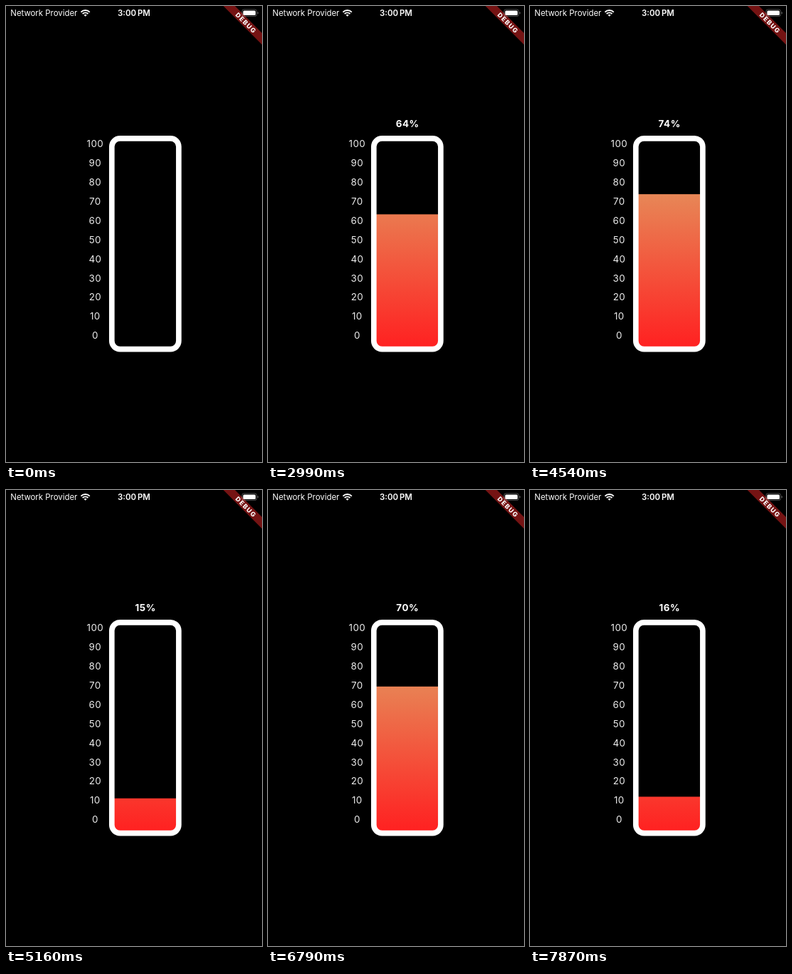
Animation of 360x640 px, one loop 7.99 s. Source, as an HTML page:

```html
<!DOCTYPE html>
<html lang="en">
<head>
<meta charset="utf-8">
<title>Level gauge</title>
<style>
html, body { margin: 0; width: 100%; height: 100%; overflow: hidden; background: #000; }
svg { display: block; width: 360px; height: 640px; font-family: Inter, Roboto, sans-serif; fill: #fff; }
.mid { text-anchor: middle; }
.scale { font-size: 13.4px; letter-spacing: .35px; fill: #ececec; }
#value { font-size: 13.4px; font-weight: 700; letter-spacing: .5px; }
.bar { font-size: 11.4px; }
.clock { font-size: 11.5px; font-weight: 600; word-spacing: -1.2px; }
.debug { font-size: 9.3px; font-weight: 800; letter-spacing: 1.3px; }
</style>
</head>
<body>
<svg viewBox="0 0 360 640">
  <defs>
    <linearGradient id="heat" gradientUnits="userSpaceOnUse" x1="0" y1="189.7" x2="0" y2="477.7">
      <stop offset="0" stop-color="#dfaa69"/>
      <stop offset="1" stop-color="#ff2121"/>
    </linearGradient>
    <clipPath id="inside"><rect x="152" y="189" width="87.6" height="289.4" rx="8.4"/></clipPath>
  </defs>

  <g id="scale" class="scale mid"></g>
  <text id="value" class="mid" x="196.2" y="169.5"></text>
  <rect id="fill" x="152" width="88" fill="url(#heat)" clip-path="url(#inside)"/>
  <rect x="148.8" y="185.86" width="94.1" height="295.7" rx="11.5" fill="none" stroke="#fff" stroke-width="7.68"/>

  <g transform="translate(360 0) rotate(45) scale(.96)">
    <rect x="-42" y="28" width="84" height="12" fill="#751313"/>
    <text class="debug mid" x="1" y="37.5">DEBUG</text>
  </g>

  <text class="bar" x="6.3" y="14">Network Provider</text>
  <text class="clock mid" x="180" y="14">3:00 PM</text>
  <g fill="none" stroke="#fff" stroke-width="1.9">
    <path d="M105.4 8.6a8.8 8.8 0 0 1 12.4 0"/>
    <path d="M107.7 11a5.6 5.6 0 0 1 7.8 0"/>
  </g>
  <path d="M109.6 12.7a2.9 2.9 0 0 1 4 0l-2 2.1z"/>
  <rect x="331.9" y="4.9" width="20.6" height="9.6" rx="2.6" fill="none" stroke="#fff" stroke-opacity=".35" stroke-width=".9"/>
  <rect x="333.4" y="6.4" width="17.6" height="6.6" rx="1.5"/>
  <path d="M353.7 8.1q1.3 .5 1.3 1.6t-1.3 1.6z" fill-opacity=".4"/>
</svg>
<script>
const LOOP = 7990, STEP = 108, BOTTOM = 477.7, UNIT = 2.88;

// Key levels: [time ms, percent]
const keys = [
  [0, 0], [1810, 0], [2214, 7.9], [2700, 59], [2900, 62], [3618, 100], [4104, 100], [4914, 28],
  [5130, 15.6], [5560, 14], [6102, 49.4], [6480, 75], [6750, 70.1], [7506, 22.7], [7830, 16.4],
  [LOOP, 16.4]
];

const gap = i => (keys[i + 1][1] - keys[i][1]) / (keys[i + 1][0] - keys[i][0]);
const slopes = keys.map((_, i) => {
  if (!i || i === keys.length - 1) return 0;
  const a = gap(i - 1), b = gap(i);
  return a * b > 0 ? 2 * a * b / (a + b) : 0;
});

// Monotone cubic through the keys
function level(t) {
  let i = 0;
  while (i < keys.length - 2 && t >= keys[i + 1][0]) i++;
  const [t0, a] = keys[i], [t1, b] = keys[i + 1];
  const d = t1 - t0, s = (t - t0) / d, r = 1 - s;
  return a * r * r * (1 + 2 * s) + b * s * s * (3 - 2 * s)
    + d * s * r * (slopes[i] * r - slopes[i + 1] * s);
}

const $ = id => document.getElementById(id);
const fill = $('fill'), value = $('value');

for (let i = 0; i <= 10; i++) {
  const label = document.createElementNS('http://www.w3.org/2000/svg', 'text');
  label.setAttribute('x', 125.3);
  label.setAttribute('y', 198.4 + i * 26.88);
  label.textContent = 100 - i * 10;
  $('scale').append(label);
}

// The gauge refreshes once per STEP
function draw(t) {
  const tick = Math.max(0, Math.floor(t / STEP - .5) + .5) * STEP;
  const v = level(tick);
  fill.setAttribute('y', BOTTOM - v * UNIT);
  fill.setAttribute('height', v * UNIT + 1);
  fill.style.display = v > 0 ? '' : 'none';
  value.textContent = v > 0 ? Math.floor(v + .01) + '%' : '';
}

const start = performance.now();
function frame() {
  draw((performance.now() - start) % LOOP);
  requestAnimationFrame(frame);
}
frame();
</script>
</body>
</html>
```
